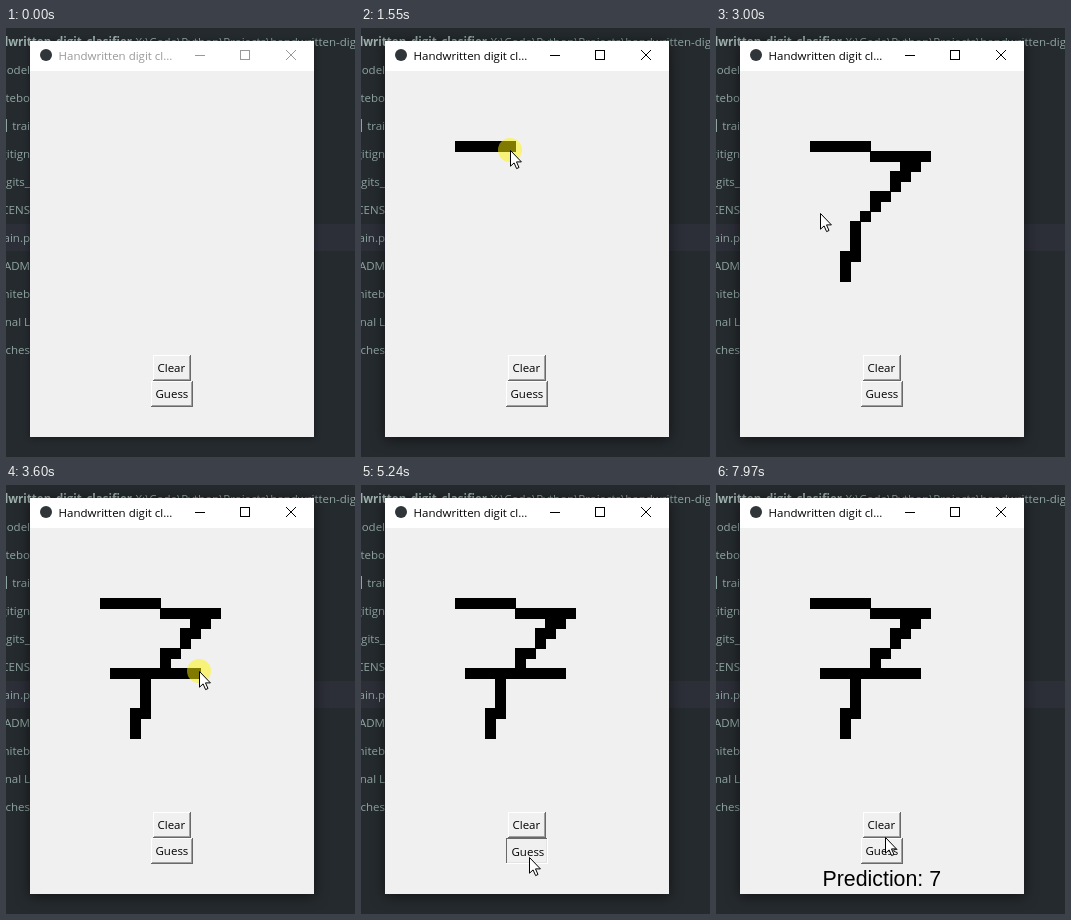
Animation of 349x429 px, one loop 8000 ms. Source, as an HTML page:

```html
<!DOCTYPE html>
<html lang="en">
<head>
<meta charset="utf-8">
<title>Handwritten digit classifier</title>
<style>
  html, body { margin: 0; width: 100%; height: 100%; overflow: hidden; background: #252a2e; }
  svg { display: block; width: 349px; height: 429px; }
  text { font: 11.5px "Open Sans", "Noto Sans", sans-serif; white-space: pre; }
  .tree text { fill: #8fa5a1; text-anchor: end; }
  .tree .bold { font-weight: 700; fill: #9db0ac; }
  .frame { fill: #f0f0f0; filter: drop-shadow(0 1px 3px rgba(0,0,0,.4)); }
  .chrome { fill: #999; stroke: #999; }
  .chrome text { stroke: none; }
  .chrome path { fill: none; stroke-width: 1; }
  .active .chrome { fill: #000; stroke: #000; }
  .active .frame { filter: drop-shadow(0 2px 7px rgba(0,0,0,.55)); }
  .crisp { shape-rendering: crispEdges; }
  text.label { font: 21.33px "Liberation Sans", Arial, sans-serif; }
  .hide { visibility: hidden; }
  .lt { fill: #fff; } .dk { fill: #696969; } .md { fill: #a0a0a0; } .face { fill: #f0f0f0; }
  .pressed .lt { fill: #696969; } .pressed .dk { fill: #fff; } .pressed .md { fill: #e3e3e3; }
  .pressed text { transform: translate(1px, 1px); }
</style>
</head>
<body>
<svg id="stage" viewBox="0 0 349 429">
  <rect width="349" height="429" fill="#252a2e"/>
  <rect y="196" width="349" height="27" fill="#2c2e38"/>
  <g class="tree" id="tree">
    <text class="bold" x="126" y="18">handwritten_digit_clasifier</text>
    <text x="350" y="18">X:\Code\Python\Projects\handwritten-dig</text>
    <rect y="91" width="1" height="13" fill="#8fa5a1"/>
  </g>

  <rect class="frame" x="24" y="13" width="284" height="396"/>
  <rect x="24" y="13" width="284" height="30" fill="#fff"/>
  <circle cx="40" cy="27" r="6" fill="#30353a"/>
  <g class="chrome">
    <text x="52.5" y="32">Handwritten digit cl...</text>
    <path class="crisp" d="M189 27.5h10M234.5 22.5h9v9h-9z"/>
    <path d="M280 22l10 10M290 22l-10 10"/>
  </g>

  <g id="cells" class="crisp"></g>
  <g id="buttons"></g>
  <text id="result" class="label" x="106.5" y="401">Prediction: 7</text>

  <g id="pointer">
    <circle id="glow" r="12" fill="rgba(255,245,0,.5)"/>
    <path d="M.5 .5V16.2L4.1 12.9 6.6 18.6 9 17.5 6.5 11.9H11.4Z" fill="#fff" stroke="#000"/>
  </g>
</svg>
<script>
const LOOP = 8000, CELL = 10, LEFT = 94, TOP = 113;
const $ = id => document.getElementById(id);

function add(parent, tag, attrs, text) {
  const el = document.createElementNS("http://www.w3.org/2000/svg", tag);
  for (const k in attrs) el.setAttribute(k, attrs[k]);
  if (text) el.textContent = text;
  parent.appendChild(el);
  return el;
}

// Project tree, only the part left of the window shows
["model", "notebo", "trai", ".gitign", "digits_", "LICENS", "main.p", "READM", "whiteb", "External L", "Scratches"]
  .forEach((name, i) => add($("tree"), "text", { x: 24, y: 46 + 28 * i }, name));

function button(x, y, w, label) {
  const g = add($("buttons"), "g", {}), h = 26;
  const box = (cls, near, far) => add(g, "rect",
    { class: cls + " crisp", x: x + near, y: y + near, width: w - near - far, height: h - near - far });
  box("dk", 0, 0);
  box("lt", 0, 1);
  box("md", 1, 1);
  box("face", 1, 2);
  add(g, "text", { x: x + 4.5, y: y + 17 }, label);
  return g;
}
button(147, 327, 38, "Clear");
const guess = button(145, 353, 42, "Guess");

// A stroke paints its cells as the pen reaches them
const across = { start: 1410, end: 2100, hit: (c, p) => c.x <= p.x };
const down = {
  start: 2100, end: 2720,
  hit(c, p) {
    const row = Math.floor((p.y - TOP) / CELL);
    return c.row < row || c.row === row && c.x + CELL > p.x;
  }
};
const bar = { start: 3130, end: 3800, hit: across.hit };

const cells = [];
function paint(stroke, row, from, to) {
  for (let col = from; col <= to; col++) {
    const x = LEFT + CELL * col;
    const el = add($("cells"), "rect", { x, y: TOP + CELL * row, width: 11, height: 11 });
    cells.push({ el, x, row, stroke });
  }
}
paint(across, 0, 0, 5);
paint(across, 1, 6, 11);
const wide = [2, 3, 5, 11];
[9, 8, 8, 6, 6, 5, 4, 4, 4, 3, 3, 3].forEach((col, i) =>
  paint(down, i + 2, col, col + wide.includes(i + 2)));
paint(bar, 7, 1, 10);

// Pointer moves in even steps from one place to the next
const moves = [];
const move = (pen, start, end, steps, ease, ...path) =>
  moves.push({ pen, start, end, last: steps - 1, ease, path });
const jump = (pen, t, x, y) => move(pen, t, t, 1, 1, [x, y]);

move(false, 260, 1010, 12, 2, [303, 400], [117, 120]);
move(false, 1080, 1210, 3, 1, [111, 119], [102, 118]);
move(true, 1410, 1550, 3, 1, [102, 118], [149, 122]);
move(true, 1620, 1900, 5, 1.5, [165, 123], [205, 124]);
jump(true, 2100, 188, 146);
move(true, 2170, 2650, 8, 1, [165, 168], [145, 193], [135, 225], [128, 246]);
move(false, 2720, 2860, 3, 1, [128, 244], [108, 188]);
move(false, 2930, 3000, 2, 1, [105, 186], [104, 185]);
move(true, 3130, 3600, 8, 1, [110, 185], [193, 186]);
move(true, 3660, 3730, 2, 1, [197, 186], [200, 186]);
move(false, 3800, 4560, 12, 2, [199, 193], [168, 371]);
jump(true, 4630, 168, 371);
jump(false, 4700, 168, 371);
jump(false, 5240, 168, 372);
move(false, 6230, 6360, 2, 1, [168, 373], [167, 374]);
jump(false, 6560, 167, 375);
move(false, 7820, 7970, 3, 1, [168, 370], [169, 352]);

function pose(t) {
  const m = moves.filter(m => m.start <= t).pop();
  if (!m) return null;
  let u = 0;
  if (m.last) {
    const step = Math.floor((t - m.start) / (m.end - m.start) * m.last + 0.08);
    u = 1 - (1 - Math.min(1, step / m.last)) ** m.ease;
  }
  u *= m.path.length - 1;
  const i = Math.floor(u), a = m.path[i], b = m.path[i + 1] || a;
  const [x, y] = a.map((v, k) => Math.round(v + (b[k] - v) * (u - i)));
  return { x, y, pen: m.pen };
}

const show = (el, on) => el.classList.toggle("hide", !on);

function draw(t) {
  const p = pose(t);
  show($("pointer"), p);
  if (p) $("pointer").setAttribute("transform", `translate(${p.x} ${p.y})`);
  show($("glow"), p && p.pen);
  for (const c of cells) {
    const { start, end, hit } = c.stroke;
    show(c.el, t >= end || t >= start && hit(c, p));
  }
  $("stage").classList.toggle("active", t >= 1410);
  guess.classList.toggle("pressed", t >= 4630 && t < 7090);
  show($("result"), t >= 7090);
}

const origin = performance.now();
function tick() {
  draw((performance.now() - origin) % LOOP);
  requestAnimationFrame(tick);
}
tick();
</script>
</body>
</html>
```
